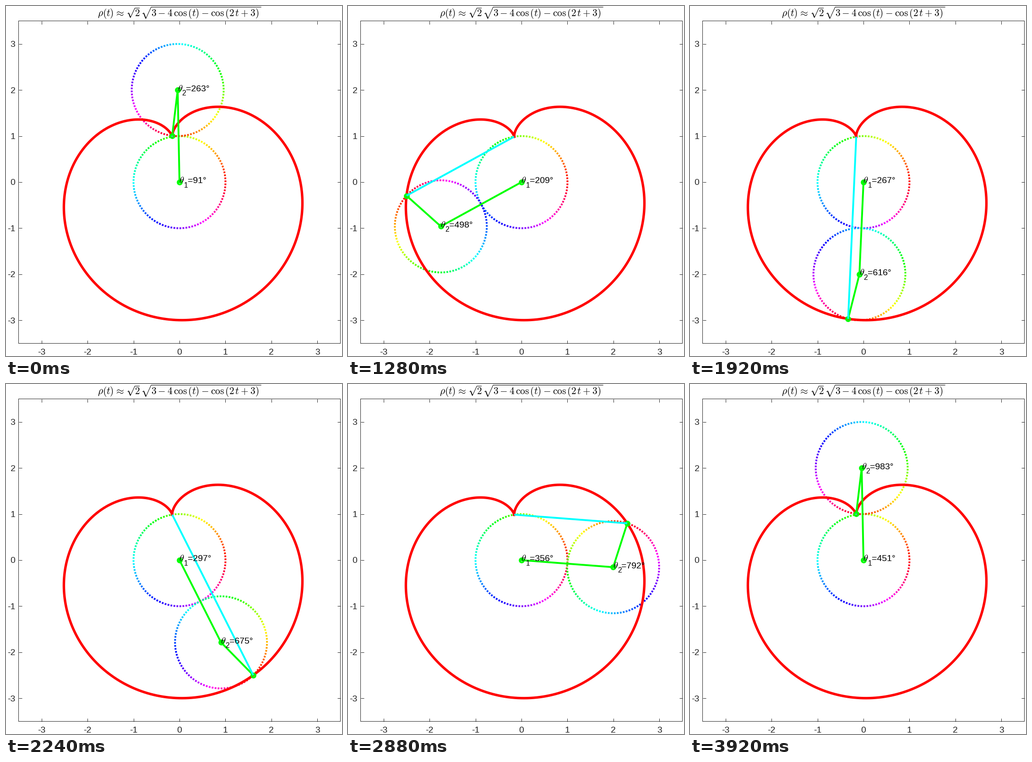
Write a matplotlib script that moves like this. It is 734x763 px and loops after 4 s.

```python
import numpy as np
import matplotlib.pyplot as plt
from matplotlib.animation import FuncAnimation
from matplotlib.collections import LineCollection
from matplotlib.colors import hsv_to_rgb
from matplotlib.lines import Line2D

W, H, DPI = 734, 763, 64
PX = 72 / DPI                      # points per pixel
FRAMES, INTERVAL = 50, 80
LEFT, RIGHT, TOP, BOTTOM = 27.5, 730.5, 32.5, 735.5
UNIT = (RIGHT - LEFT) / 7          # pixels per data unit

ARM_START, ROLL_START = np.radians([91.13, 263.15])
ROLL_OFFSET = ROLL_START - 2 * ARM_START
CUSP_ANGLE = np.pi - ROLL_OFFSET

GREEN, CYAN, RED, INK = "#00ff00", "#00ffff", "#ff0000", "#262626"
DASH_COUNT, DASH_FILL = 96, 0.57
LABEL_SIZE, EM = 19.4, 21.33

plt.rcParams["font.family"] = "Liberation Sans"
plt.rcParams["mathtext.fontset"] = "cm"


def polar(angle):
    return np.stack([np.cos(angle), np.sin(angle)], axis=-1)


def tracer(arm):
    """Point on the unit circle rolling around the fixed unit circle."""
    return 2 * polar(arm) + polar(2 * arm + ROLL_OFFSET)


fig = plt.figure(figsize=(W / DPI, H / DPI), dpi=DPI, facecolor="white")
ax = fig.add_axes([LEFT / W, 1 - BOTTOM / H, (RIGHT - LEFT) / W, (BOTTOM - TOP) / H])
ax.set(xlim=(-3.5, 3.5), ylim=(-3.5, 3.5), xticks=range(-3, 4), yticks=range(-3, 4))
ax.tick_params(direction="in", top=True, right=True, length=7 * PX, width=PX,
               color=INK, labelbottom=False, labelleft=False)
for spine in ax.spines.values():
    spine.set(color=INK, linewidth=PX, snap=False)


def stage_text(x, y, text, size, **style):
    """Text at a pixel position measured from the top left."""
    return fig.text(x / W, 1 - y / H, text, fontsize=size * PX,
                    va="baseline", **style)


def stage_line(xs, ys, width):
    line = Line2D(np.array(xs) / W, 1 - np.array(ys) / H, color="black",
                  linewidth=width * PX, transform=fig.transFigure,
                  solid_capstyle="butt", solid_joinstyle="miter")
    fig.add_artist(line)


def radical(x, top, size, bar_end):
    """Root sign of the given height with its bar."""
    def at(u, v):
        return x + u * size, top + v * size
    hook, peak, foot, tip = at(0.09, 0.57), at(0.2, 0.49), at(0.39, 0.97), at(0.84, 0)
    stage_line(*zip(hook, peak), 0.9)
    stage_line(*zip(peak, foot), 1.9)
    stage_line(*zip(foot, tip, (bar_end, top)), 1)


def title(x, baseline):
    """Formula set in em steps, with the root signs drawn as strokes."""
    def put(em, text):
        stage_text(x + em * EM, baseline, text, EM, ha="left", color="black")
    put(0, r"$\rho(t)\hspace{0.078}\approx$")
    radical(x + 2.99 * EM, 4.5, EM, x + 4.323 * EM)
    put(3.823, "$2$")
    radical(x + 4.49 * EM, 2.5, 1.2 * EM, x + 16.777 * EM)
    put(5.49, r"$3\:{-}\:4\,\mathrm{cos}\,(t)\:{-}\:\mathrm{cos}\,(2\,t\:{+}\:3)$")


for n in range(-3, 4):
    stage_text((LEFT + RIGHT) / 2 + n * UNIT, 760.5, str(n), LABEL_SIZE,
               ha="center", color=INK)
    stage_text(20.5, (TOP + BOTTOM) / 2 - n * UNIT + 6.5, str(n), LABEL_SIZE,
               ha="right", color=INK)
title(199.8, 22.5)


def dash_arcs(center, start):
    step = 2 * np.pi / DASH_COUNT
    begin = start + step * np.arange(DASH_COUNT)
    angles = begin[:, None] + np.linspace(0, DASH_FILL * step, 4)
    return polar(angles) + center


def rainbow_circle():
    hue = np.arange(DASH_COUNT) / DASH_COUNT
    hsv = np.stack([hue, np.ones_like(hue), np.ones_like(hue)], axis=-1)
    ring = LineCollection(dash_arcs(np.zeros(2), 0), colors=hsv_to_rgb(hsv),
                          linewidths=4 * PX, capstyle="butt", zorder=2)
    return ax.add_collection(ring, autolim=False)


class AngleLabel:
    """Greek letter, subscript and value placed beside a moving point."""

    def __init__(self, index):
        parts = [(-0.5, -2.5, r"$\theta$", 20.5), (9.5, -12, str(index), 15.5),
                 (18, -2.5, "", LABEL_SIZE)]
        self.parts = [
            ax.annotate(text, (0, 0), xytext=(dx * PX, dy * PX),
                        textcoords="offset points", fontsize=size * PX,
                        color="black", ha="left", va="baseline", zorder=8)
            for dx, dy, text, size in parts
        ]

    def update(self, point, angle):
        for part in self.parts:
            part.xy = point
        self.parts[-1].set_text(f"={np.degrees(angle):.0f}°")


fixed_ring = rainbow_circle()
rolling_ring = rainbow_circle()

path = tracer(CUSP_ANGLE + np.linspace(0, 2 * np.pi, 721))
ax.plot(*path.T, color=RED, linewidth=5.4 * PX, zorder=4)

arms, = ax.plot([], [], color=GREEN, linewidth=4 * PX, marker="o",
                markersize=8.8 * PX, markerfacecolor="none",
                markeredgecolor=GREEN, markeredgewidth=4 * PX, zorder=5)
chord, = ax.plot([], [], color=CYAN, linewidth=4 * PX,
                 solid_capstyle="butt", zorder=6)
arm_label, roll_label = AngleLabel(1), AngleLabel(2)
origin, cusp = np.zeros(2), polar(CUSP_ANGLE)


def update(frame):
    turn = 2 * np.pi * frame / (FRAMES - 1)
    arm, roll = ARM_START + turn, ROLL_START + 2 * turn
    center, tip = 2 * polar(arm), tracer(arm)
    rolling_ring.set_segments(dash_arcs(center, roll))
    arms.set_data(*np.array([origin, center, tip]).T)
    chord.set_data(*np.array([cusp, tip]).T)
    arm_label.update(origin, arm)
    roll_label.update(center, roll)
    return rolling_ring, arms, chord, *arm_label.parts, *roll_label.parts


animation = FuncAnimation(fig, update, frames=FRAMES, interval=INTERVAL,
                          repeat=True, repeat_delay=0, blit=False)
plt.show()
```
